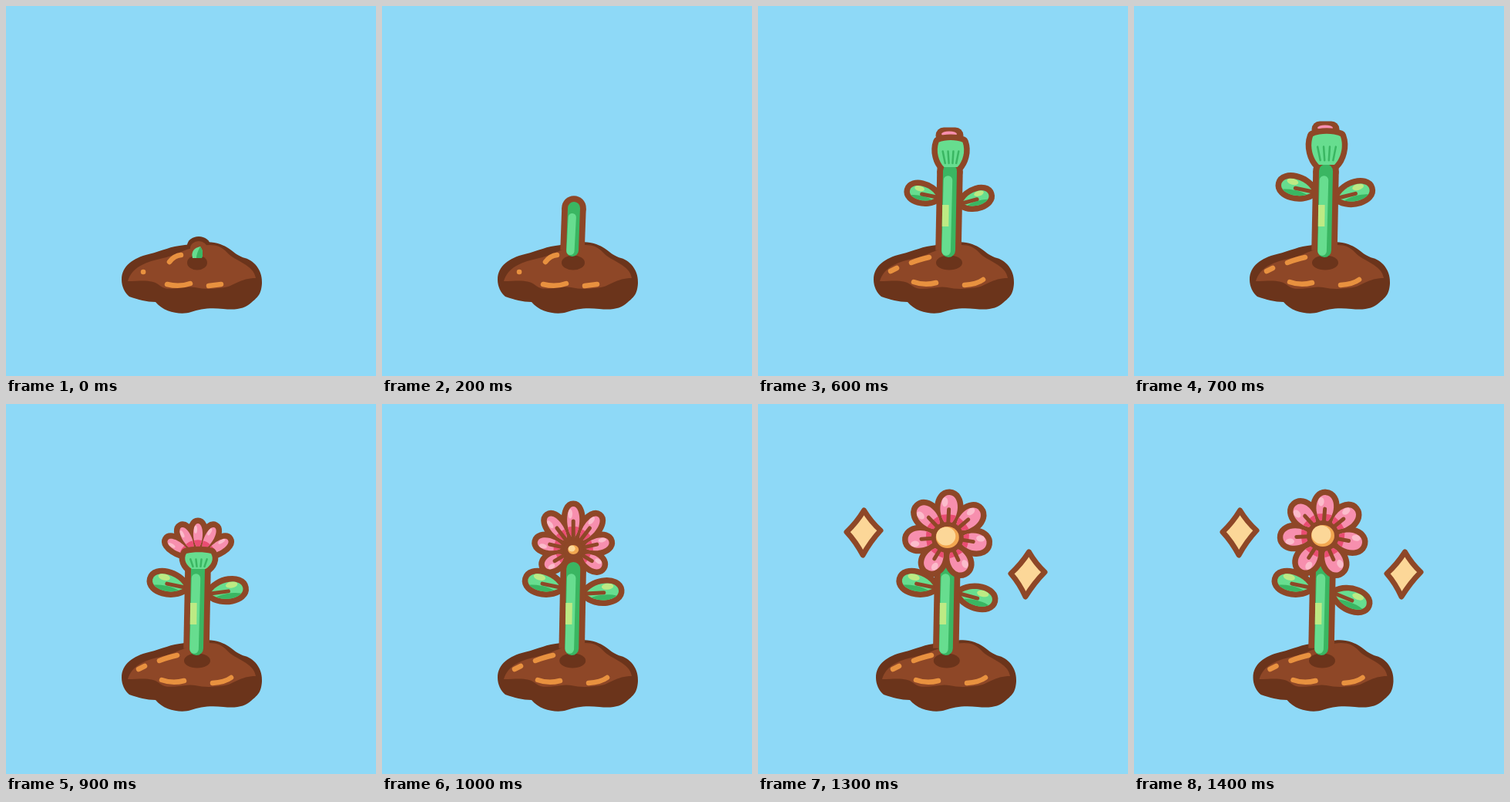
Animation of 480x480 px, one loop 1.5 s. Source, as an HTML page with a canvas:

```html
<!DOCTYPE html>
<html lang="en">
<head>
<meta charset="utf-8">
<title>Growing flower</title>
<style>
  html, body { margin: 0; height: 100%; overflow: hidden; background: #8ed9f7; }
  canvas { display: block; width: 100vw; height: 100vh; }
</style>
</head>
<body>
<canvas id="stage" width="480" height="480"></canvas>
<script>
const ctx = document.getElementById('stage').getContext('2d');
const STEP = 100, STEPS = 15;
const SKY = '#8ed9f7', BROWN = '#8e4727', DARK = '#6b341b', ORANGE = '#e8913f';
const GREEN = '#67dd8f', SHADE = '#3ab662', LIME = '#bdea84';
const PINK = '#f78fae', ROSE = '#e94d72', PALE = '#fbbccb';
const CREAM = '#fcd798', AMBER = '#f2a650';
const { min, max, sin, cos, PI } = Math;

const soil = new Path2D('M150 355C150 337 165 327 185 322S212 312 232 310S262 303 278 309S296 323 310 327S333 345 332 360S326 378 318 385S300 395 282 393S252 393 240 397S205 398 194 384C182 384 172 381 160 377C154 372 150 364 150 355Z');
const soilTop = new Path2D('M158 357C163 340 178 333 200 328S225 318 245 313S277 309 287 320S322 336 324 353C304 353 296 363 284 365S258 368 245 365S210 372 200 363S176 357 158 357Z');
const earlyGlints = new Path2D('M178 345h.1M212 332Q218 324 227 323M209 361Q225 365 239 360M263 363L279 361');
const glints = new Path2D('M172 344L180 340M199 333Q212 328 222 326M202 358Q216 363 231 359M268 362Q284 361 292 355');

function fill(path, color) {
  ctx.fillStyle = color;
  ctx.fill(path);
}

function stroke(path, width, color = BROWN, cap = 'round') {
  ctx.lineCap = cap;
  ctx.strokeStyle = color;
  ctx.lineWidth = width;
  ctx.stroke(path);
}

function oval(x, y, rx, ry, color) {
  const path = new Path2D();
  path.ellipse(x, y, rx, ry, 0, 0, 2 * PI);
  fill(path, color);
}

function line(x1, y1, x2, y2, width, color, cap) {
  stroke(new Path2D(`M${x1} ${y1}L${x2} ${y2}`), width, color, cap);
}

// Leaf or petal outline along the x axis
function podPath(start, len, half) {
  const mid = start + (len - start) * .3, h = half * 1.25;
  return new Path2D(`M${start} 0C${mid} ${-h * 1.15} ${len} ${-h} ${len} 0C${len} ${h} ${mid} ${h * 1.15} ${start} 0Z`);
}

function placed(x, y, angle, flip, draw) {
  ctx.save();
  ctx.translate(x, y);
  ctx.rotate(angle);
  ctx.scale(1, flip);
  draw();
  ctx.restore();
}

function clipped(path, draw) {
  ctx.save();
  ctx.clip(path);
  draw();
  ctx.restore();
}

function ground(step) {
  placed(max(0, step - 11) * 1.5, 0, 0, 1, () => {
    if (!step) oval(250, 311, 15, 12, DARK);
    fill(soil, DARK);
    if (!step) oval(250, 314, 11, 9, BROWN);
    fill(soilTop, BROWN);
    stroke(step < 4 ? earlyGlints : glints, 6.5, ORANGE);
  });
}

function leaf(x, y, angle, flip, len) {
  const half = len * .25, path = podPath(0, len, half);
  placed(x, y, angle, flip, () => {
    stroke(path, 15);
    fill(path, GREEN);
    clipped(path, () => {
      oval(len * .5, half * 1.1, len * .55, half * .75, SHADE);
      oval(len * .68, -half * .6, len * .18, half * .38, LIME);
    });
    line(0, 0, len * .55, 1, 5, BROWN);
  });
}

function leaves(step, x) {
  const len = min(43, 6 * step), y = max(238, 290 - 7 * step);
  leaf(x - 15, y, PI + .25, -1, len);
  leaf(x + 18, y + 8, .007 * (step - 4) ** 2 - .35, 1, len);
}

// Petals fan out from the cup, then spread into a full ring around the disc
function bloom(step, x) {
  const open = step > 9, ring = max(0, step - 11);
  const y = step < 11 ? 177 + 12 * min(2, 11 - step) : 177 - 2 * ring;
  const spread = min(1, .2 * step - 1.2), reach = min(52, 19 + 3 * step);
  const half = min(11.2, 2 * step - 12), start = reach * .28;
  const last = open ? 3 : 2;

  const eachPetal = draw => {
    for (let i = -last; i <= last; i++) {
      const turn = i * 2 * PI / 7;
      const angle = spread * (turn - .11 * sin(turn)) + .025 * ring;
      const len = reach + (open ? (7 - 2 * ring) * cos(turn) : 0);
      placed(x, y, angle - PI / 2, 1, () => draw(podPath(start, len, half), len));
    }
  };
  eachPetal(path => stroke(path, 15));
  eachPetal((path, len) => {
    fill(path, PINK);
    clipped(path, () => {
      oval(len * .34, 0, len * .2, half * 2, ROSE);
      oval(len * .83, -half * .5, len * .11, half * .35, PALE);
    });
    if (open) line(len * .25, 0, len * .66, 0, 5, BROWN);
  });
  if (!open) return;
  const r = min(15, 7 * (step - 9));
  oval(x, y, r + 6, r + 5, BROWN);
  oval(x, y, r, r - 1, AMBER);
  oval(x - 2, y - 1.5, r - 2.5, r - 3, CREAM);
}

function cupAt(step) {
  const rise = min(step, 7) - 4, sink = max(0, step - 7);
  const top = 191 - 8 * rise + 13 * sink, bottom = 215 - 3 * rise + 4 * sink;
  const half = 12 + 2.6 * rise - sink, height = bottom - top, x = 250;
  const px = k => x + k * half, py = k => top + k * height;
  const path = new Path2D();
  path.moveTo(px(-.9), py(.05));
  path.bezierCurveTo(px(-.4), py(-.06), px(.4), py(-.06), px(.9), py(.05));
  path.bezierCurveTo(px(1.15), py(.4), px(.9), py(.8), px(.5), py(1));
  path.lineTo(px(-.5), py(1));
  path.bezierCurveTo(px(-.9), py(.8), px(-1.15), py(.4), px(-.9), py(.05));
  path.closePath();

  const paint = () => {
    fill(path, GREEN);
    for (const k of [-.6, -.2, .2, .6]) line(px(k), py(.4), px(k * .7), py(.85), 2.5, SHADE);
  };
  return { path, top, paint };
}

function sparkle(x, y, lean) {
  const path = new Path2D();
  const corners = [[x - lean / 2, y - 28], [x + 22, y - 2], [x + lean, y + 30], [x - 22, y]];
  path.moveTo(...corners[3]);
  corners.forEach(([cx, cy], i) => {
    const [px, py] = corners[(i + 3) % 4];
    path.quadraticCurveTo((px + cx) * .43 + x * .14, (py + cy) * .43 + y * .14, cx, cy);
  });
  path.closePath();
  fill(path, CREAM);
  stroke(path, 7);
}

function sprout() {
  fill(new Path2D('M242 327Q239 315 252 312Q257 319 254 327Z'), GREEN);
  fill(new Path2D('M247 327Q247 321 252 312Q257 319 254 327Z'), SHADE);
}

function draw(step) {
  const x = 247 - max(0, step - 9) * .8, topX = x + 2;
  const baseY = 317, topY = max(214, 306 - 22 * step);
  const w = min(18, 12 + 2 * step), outer = w + 15.5;
  const cup = step > 3 && step < 10 && cupAt(step);
  const open = step > 9;

  ctx.fillStyle = SKY;
  ctx.fillRect(0, 0, 480, 480);
  ctx.lineJoin = 'round';
  ground(step);
  if (step > 2) leaves(step, x);
  if (step > 7 && !open) bloom(step, topX);
  if (step) {
    line(x, baseY, topX, topY, outer, BROWN, 'butt');
    oval(topX, topY, outer / 2, outer / 2, BROWN);
  }
  if (step === 6 || step === 7) {
    line(241, cup.top - 7, 256, cup.top - 7, 21, BROWN);
    oval(248, cup.top - 9, 10, 3.5, PINK);
  }
  if (cup) stroke(cup.path, 15);

  oval(x + 1, 333, min(17, 13 + step), 9.5, DARK);
  if (step) {
    line(x, baseY, topX, topY, w, SHADE);
    line(x - w * .16, baseY + 1, topX - w * .14, topY + 12, w * .64, GREEN);
    if (step > 3) line(x - w * .22, 286, x - w * .2, 258, 8.5, LIME, 'butt');
  } else sprout();
  if (cup) cup.paint();
  if (open) bloom(step, topX);
  if (step > 10) {
    const lean = step > 12 ? -1 : 2;
    sparkle(137, 166, lean);
    sparkle(350, 220, lean - 2);
  }
}

function tick(now) {
  draw(Math.floor(now / STEP) % STEPS);
  requestAnimationFrame(tick);
}
tick(0);
</script>
</body>
</html>
```
